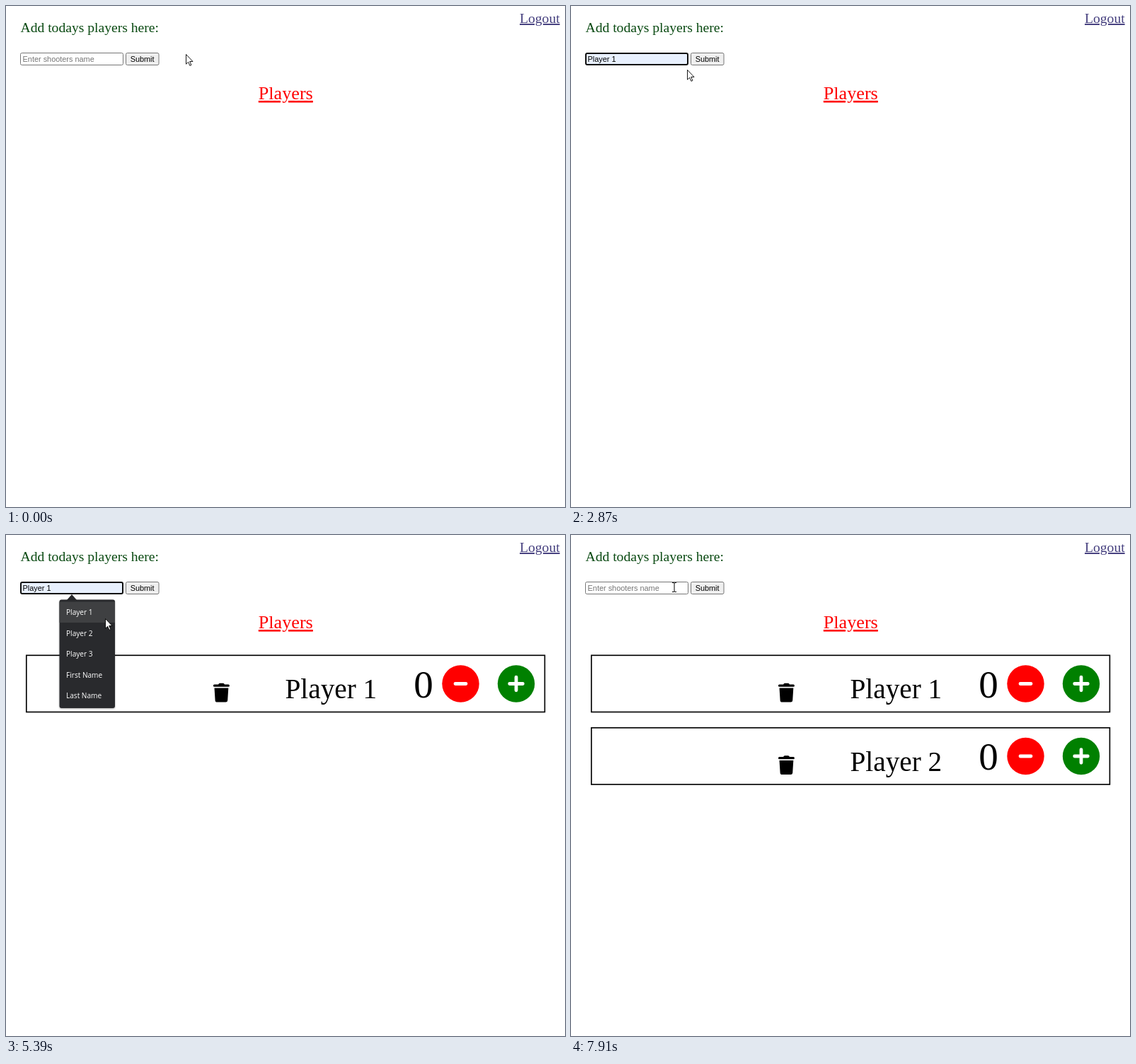
Animation, 790 px wide and 709 px high, one loop 8000 ms. Source, as an HTML page:

```html
<!DOCTYPE html>
<html lang="en">
<head>
<meta charset="utf-8">
<title>Players</title>
<style>
  html, body { margin: 0; width: 100%; height: 100%; overflow: hidden; background: #fff; }
  svg { display: block; }
  text { font-family: "Liberation Serif", serif; }
  .ui { font: 10.9px "Liberation Sans", sans-serif; }
  .menu { font: 10.1px "Open Sans", sans-serif; fill: #fff; }
  .link { text-decoration: underline; }
</style>
</head>
<body>
<svg width="790" height="709" viewBox="0 0 790 709">
  <text x="20.5" y="37" font-size="19.62" fill="#0a4a12">Add todays players here:</text>
  <text class="link" x="726" y="24" font-size="19.62" fill="#46407f">Logout</text>
  <text class="link" x="356.8" y="132" font-size="26.16" fill="#f00" style="text-decoration-thickness:2px">Players</text>

  <rect id="field" rx="2"/>
  <text id="value" class="ui" x="23.6" y="79"></text>
  <rect id="button" x="169.5" y="66.5" width="46.5" height="17" rx="2" stroke="#767676"/>
  <text class="ui" x="192.6" y="79" text-anchor="middle">Submit</text>

  <g id="rows"></g>

  <g id="menu">
    <path d="M86 92L93 84L100 92Z" fill="#292a2d"/>
    <rect x="75.5" y="91.5" width="78.5" height="153.5" rx="3" fill="#292a2d"
      style="filter:drop-shadow(0 1px 1px #0005)"/>
    <rect id="highlight" x="75.5" width="78.5" height="29.5" fill="#3f4042"/>
    <g id="items"></g>
  </g>

  <circle id="click" r="10" fill="#ff0" fill-opacity=".5"/>
  <g id="cursor">
    <path id="arrow" d="M.5 .5V14.2L3.6 11.3L5.9 16.4L7.9 15.5L5.7 10.5H10Z" fill="#fff" stroke="#000" stroke-width=".9"/>
    <path id="beam" d="M-3 -6.5H-.8L0 -5.8L.8 -6.5H3M0 -6V6M-3 6.5H-.8L0 5.8L.8 6.5H3" fill="none" stroke="#000"/>
  </g>
</svg>
<script>
const LOOP = 8000, STEP = 67.5, ITEM_TOP = 94.5, ITEM_HEIGHT = 29.5;
const el = id => document.getElementById(id);
const set = (id, attrs) => {
  for (const name in attrs) el(id).setAttribute(name, attrs[name]);
};
const show = (node, on) => { node.style.display = on ? '' : 'none'; };
const within = (t, spans) => spans.some(([from, to]) => t >= from && t < to);

// Pointer stops: time, x, y
const stops = [
  [0, 254, 68], [662.5, 254, 68], [1270, 173, 72], [1530, 150, 72],
  [1932, 150, 72], [2322, 134, 104],
  [2530, 134, 104], [3120, 187, 80],
  [4242, 187, 80], [4640, 150, 76],
  [5042, 150, 76], [5390, 140, 118], [5580, 133, 137],
  [5990, 133, 137], [6650, 189, 82], [6780, 190, 79],
  [7243, 190, 79], [7910, 146, 74], [LOOP, 146, 74]
];
const clicks = [[1600, 1670], [2390, 2530], [3520, 3660], [4780, 4920], [5860, 6000], [6930, 6980]];
const focused = [[1600, 3520], [4780, 6930]];
const menuOpen = [[1600, 2530], [4780, 6000]];
const pressed = [[3520, 4310], [6930, 7310]];
const rowTimes = [3980, 7310];

el('items').innerHTML = ['Player 1', 'Player 2', 'Player 3', 'First Name', 'Last Name']
  .map((name, i) => `<text class="menu" x="85" y="${113 + i * ITEM_HEIGHT}">${name}</text>`).join('');

el('rows').innerHTML = rowTimes.map((_, i) => `
  <g transform="translate(0 ${i * 102.5})">
    <rect x="28.8" y="170.3" width="732.6" height="80.2" fill="none" stroke="#000" stroke-width="1.65"/>
    <path d="M300 211.6L301 210.2Q301.4 209.8 302 209.8H307Q307.6 209.8 308 210.2L309 211.6H314.3
      a1.6 1.6 0 0 1 0 3.2H294.5a1.6 1.6 0 0 1 0-3.2Z
      M294.5 216.4H314.3L313.2 234Q313 236.6 310.5 236.6H298.3Q295.8 236.6 295.6 234Z"/>
    <text x="394.5" y="231" font-size="39.24">Player ${i + 1}</text>
    <text x="590" y="229.5" font-size="55" text-anchor="middle">0</text>
    <circle cx="642.5" cy="210.5" r="26.2" fill="#f00"/>
    <circle cx="721" cy="210.5" r="26.2" fill="#008000"/>
    <path d="M635 210.5H650M711.7 210.5H730.3M721 201.2V219.8" stroke="#fff" stroke-width="4.8" stroke-linecap="round"/>
  </g>`).join('');

function pointerAt(t) {
  const next = stops.findIndex(stop => stop[0] > t);
  const [t0, x0, y0] = stops[next - 1], [t1, x1, y1] = stops[next];
  const k = Math.floor((t - t0) / STEP) * STEP / (t1 - t0);
  return [x0 + (x1 - x0) * k, y0 + (y1 - y0) * k];
}

function valueAt(t, hovered) {
  if (hovered >= 0) return 'Player ' + (hovered + 1);
  if (t >= 2530 && t < rowTimes[0]) return 'Player 1';
  if (t >= 5860 && t < rowTimes[1]) return 'Player 2';
  return '';
}

function draw(t) {
  const [x, y] = pointerAt(t).map(Math.round);
  const open = within(t, menuOpen), focus = within(t, focused);
  const hovered = open && y > 92 ? Math.max(0, Math.floor((y - ITEM_TOP) / ITEM_HEIGHT)) : -1;
  const value = valueAt(t, hovered);
  const inBand = y >= 66 && y < 84;
  const overField = inBand && x < 166;
  const overButton = inBand && x >= 169 && x < 216;

  const edge = focus ? 1 : .5;
  set('field', {
    x: 20 + edge, y: 66 + edge, width: 146 - 2 * edge, height: 18 - 2 * edge,
    fill: value ? '#e8f0fe' : '#fff', stroke: focus ? '#101010' : '#767676', 'stroke-width': 2 * edge
  });
  el('value').textContent = value || 'Enter shooters name';
  set('value', { fill: value ? '#000' : '#757575' });
  set('button', { fill: overButton && !within(t, pressed) ? '#e3e3e3' : '#efefef' });

  show(el('menu'), open);
  show(el('highlight'), hovered >= 0);
  set('highlight', { y: ITEM_TOP + Math.max(0, hovered) * ITEM_HEIGHT });
  rowTimes.forEach((time, i) => show(el('rows').children[i], t >= time));

  show(el('click'), within(t, clicks));
  set('click', { cx: x, cy: y });
  set('cursor', { transform: `translate(${x} ${y})` });
  show(el('beam'), overField);
  show(el('arrow'), !overField);
}

function frame() {
  draw(performance.now() % LOOP);
  requestAnimationFrame(frame);
}
frame();
</script>
</body>
</html>
```
